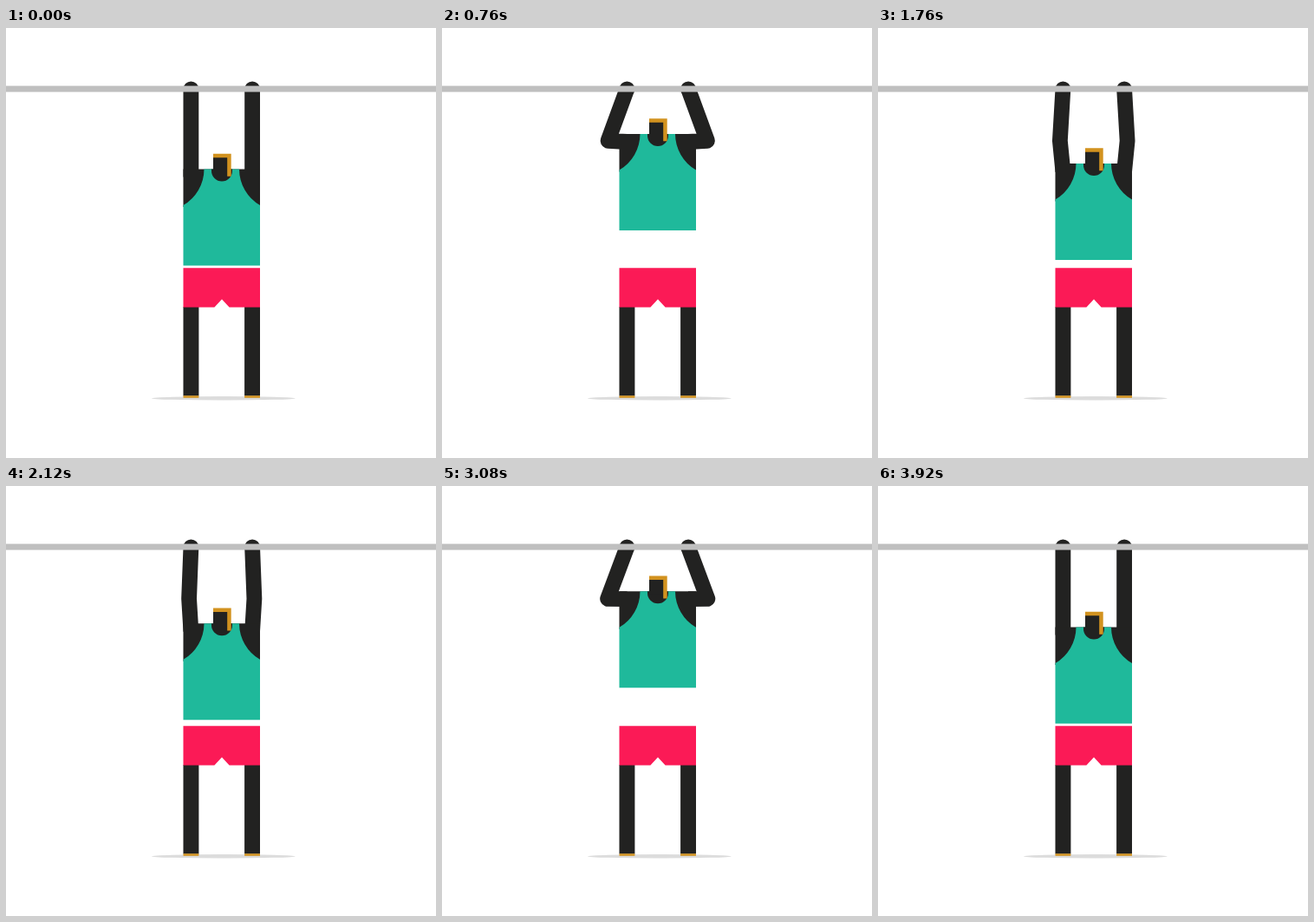
An HTML page that plays this animation: 496 px wide and 495 px high, repeating every 4 s.

```html
<!DOCTYPE html>
<html lang="en">
<head>
<meta charset="utf-8">
<title>Pull-ups</title>
<style>
  html, body { margin: 0; width: 100%; height: 100%; overflow: hidden; background: #fff; }
  svg { display: block; width: 496px; height: 495px; }
  .skin { fill: #222221; }
  .gold { fill: #d2921f; }
  .arm { fill: none; stroke: #222221; stroke-width: 17.8; stroke-linejoin: round; }
</style>
</head>
<body>
<svg viewBox="0 0 496 495">
  <ellipse cx="250.8" cy="426.3" rx="83" ry="2.2" fill="#dcdcdc"/>

  <g id="legs">
    <path class="skin" d="M204.5 321H222.4V423.5H204.5ZM275.1 321H293V423.5H275.1Z"/>
    <path class="gold" d="M204.5 423.2H222.4V425.8H204.5ZM275.1 423.2H293V425.8H275.1Z"/>
    <path fill="#fb1a56" d="M204.5 276.2H293V321.4H257.6L249 312.2L240.4 321.4H204.5Z"/>
  </g>

  <circle class="skin" cx="213.4" cy="70.3" r="8.9"/>
  <circle class="skin" cx="284.1" cy="70.3" r="8.9"/>
  <path id="left" class="arm"/>
  <path id="right" class="arm"/>

  <g id="body">
    <path class="skin" d="M204.5 162.5H293V206H204.5Z"/>
    <path fill="#1fb99b" d="M228.5 162.5H269A48.2 48.2 0 0 0 293 204V273.5H204.5V204A48.2 48.2 0 0 0 228.5 162.5Z"/>
    <path class="skin" d="M237 162.5H261V164.6A12 12 0 0 1 237 164.6Z"/>
    <path class="skin" d="M239 148H256V166H239Z"/>
    <path class="gold" d="M239 144.8H259.7V170.8H255.2V149.2H239Z"/>
  </g>

  <rect y="66.6" width="496" height="7" fill="#bfbfbf"/>
</svg>
<script>
  const LOOP = 4000, STEP = 40, REP = 1960;
  const $ = id => document.getElementById(id);
  const body = $("body"), left = $("left"), right = $("right");

  // Height of the body (px) against time (ms) for the way up
  const keys = [[0, 0], [200, 6.5], [280, 12.3], [480, 28], [560, 33.8], [760, 40.5], [840, 41.3], [980, 41.8]];
  const rate = i => (keys[i + 1][1] - keys[i][1]) / (keys[i + 1][0] - keys[i][0]);
  const slopes = keys.map(([t], i) => {
    if (i === 0 || i === keys.length - 1) return 0;
    const a = t - keys[i - 1][0], b = keys[i + 1][0] - t;
    return (b * rate(i - 1) + a * rate(i)) / (a + b);
  });

  function rise(t) {
    let i = 0;
    while (i < keys.length - 2 && t > keys[i + 1][0]) i++;
    const [t0, y0] = keys[i], [t1, y1] = keys[i + 1];
    const h = t1 - t0, s = (t - t0) / h, r = 1 - s;
    return r * r * (1 + 2 * s) * y0 + s * s * (3 - 2 * s) * y1
      + h * s * r * (r * slopes[i] - s * slopes[i + 1]);
  }

  function lift(t) {
    if (t >= 2 * REP) return 0;
    const p = t % REP;
    return rise(Math.min(p, REP - p));
  }

  const arm = (x, bend, y) => `M${x} 70.3L${x + bend} 129.8L${x} ${171.5 - y}`;

  function draw(time) {
    const y = lift(Math.floor((time % LOOP) / STEP) * STEP);
    const bend = y * 0.54;
    body.setAttribute("transform", `translate(0 ${-y})`);
    left.setAttribute("d", arm(213.4, -bend, y));
    right.setAttribute("d", arm(284.1, bend, y));
  }

  const start = performance.now();
  function tick() {
    draw(performance.now() - start);
    requestAnimationFrame(tick);
  }
  draw(0);
  requestAnimationFrame(tick);
</script>
</body>
</html>
```
